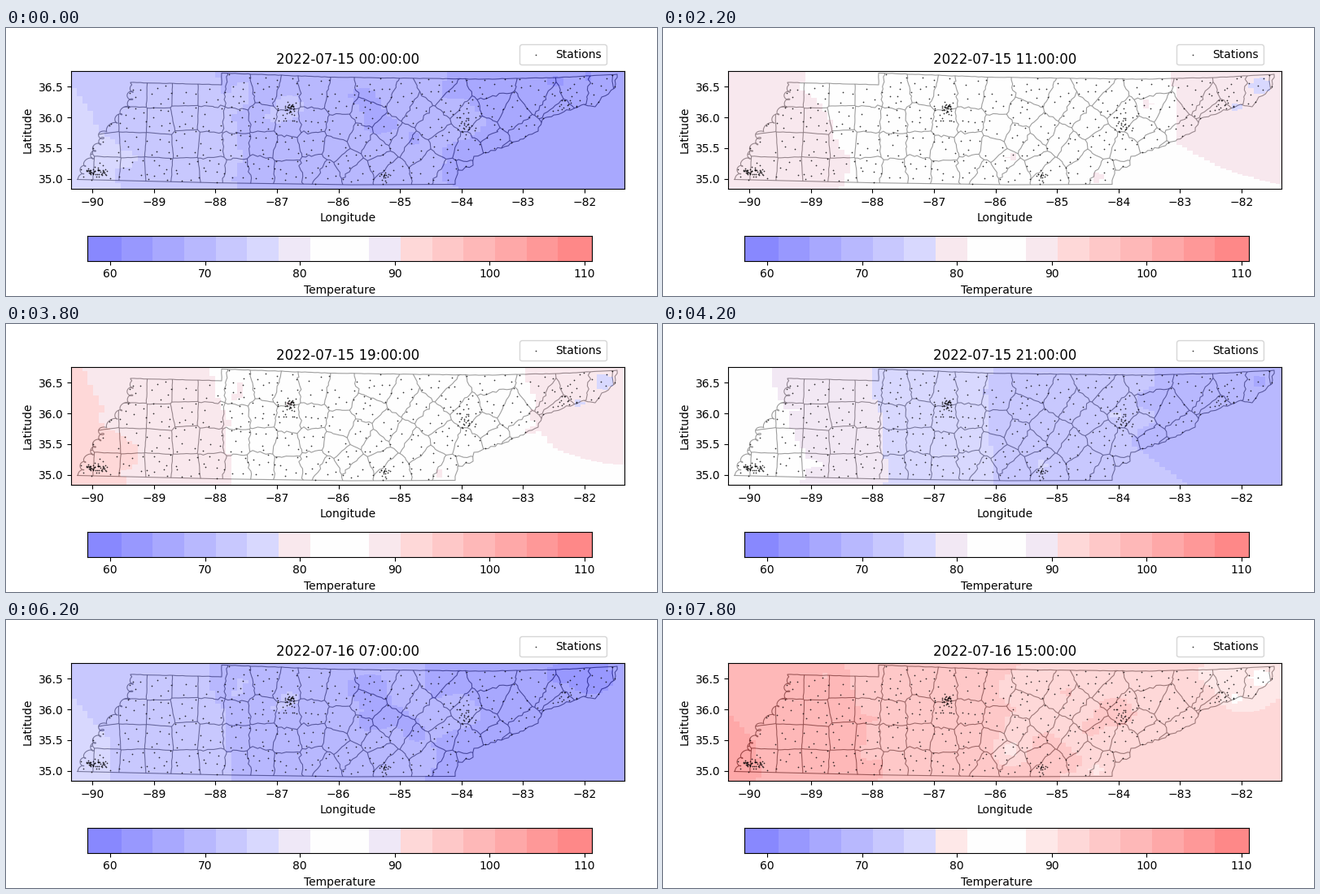
These frames come from a looping animation (800 px wide and 330 px high, 8 s). A matplotlib script:

```python
from itertools import combinations

import numpy as np
import matplotlib.pyplot as plt
from matplotlib.animation import FuncAnimation
from matplotlib.collections import LineCollection
from matplotlib.path import Path

W, H, DPI = 800, 330, 100
LEFT, RIGHT, TOP, BOTTOM = 80, 760, 52.75, 198
SCALE = 75.6  # pixels per degree
rng = np.random.default_rng(15)


def to_deg(x, y):
    """Stage pixels to longitude and latitude."""
    return -90 + (x - 106.22) / SCALE, 35 - (y - 185.6) / SCALE


def to_px(lon, lat):
    return 106.22 + SCALE * (lon + 90), 185.6 - SCALE * (lat - 35)


def rough(corners, wobble):
    """Path through the corners with small seeded bends."""
    pts = np.array(corners, float)
    out = [pts[:1]]
    for a, b in zip(pts, pts[1:]):
        n = max(1, int(np.hypot(*(b - a)) / 4))
        seg = a + (b - a) * np.linspace(0, 1, n + 1)[1:, None]
        seg[:-1] += rng.normal(0, wobble, (n - 1, 2))
        out.append(seg)
    return np.vstack(out)


def degrees(pts):
    return np.column_stack(to_deg(*pts.T))


# ---- state outline, in stage pixels ----
south = rough([(88, 186.5), (250, 190.5), (420, 193), (552, 192.5)], 0)
ridge = rough([(552, 192.5), (555, 175), (574, 169), (575, 158), (613, 146), (654, 127),
               (659, 113), (682, 105), (710, 94), (724, 97), (732, 85), (748, 74), (751, 57)], 0.8)
north = rough([(751, 57), (680, 61), (585, 63), (400, 60.5), (265, 55.5), (265, 70), (153, 67)], 0.15)

# the western edge is a river: a gentle line plus meanders
t = np.linspace(0, 1, 240)
bank = np.array([(153, 67), (154, 87), (141, 107), (119, 130), (112, 146), (99, 166), (88, 186.5)])
calm = np.minimum(1, 14 * t * (1 - t))
stops = np.linspace(0, 1, len(bank))
river = np.column_stack([
    np.interp(t, stops, bank[:, 0]) + calm * (3 * np.sin(26 * np.pi * t) + 2 * np.sin(11 * np.pi * t)),
    np.interp(t, stops, bank[:, 1]) + calm * 2.5 * np.cos(26 * np.pi * t)])
outline = degrees(np.vstack([south, ridge, north, river]))
state = Path(outline)


# ---- counties: cells around a lattice, square in the west, slanted in the east ----
def lattice():
    sites = []
    for col in range(26):
        for row in range(4):
            x = 90 + 33 * col - 0.12 * col ** 2
            y = 81 + 31 * row + 0.006 * (x - 90)
            east = np.clip((x - 270) / 200, 0, 1)
            y += 8 * east * (-1) ** col
            x += 0.8 * (120 - y) * np.clip((x - 380) / 120, 0, 1)
            sites.append(np.array([x, y]) + rng.normal(0, 1.5 + 4 * east, 2))
    return np.array(sites)


def cell_edges(sites):
    """Shared edges between the nearest-site cells."""
    norms = (sites ** 2).sum(1)
    for i, j in combinations(range(len(sites)), 2):
        a, b = sites[i], sites[j]
        if np.hypot(*(b - a)) > 110:
            continue
        mid, along = (a + b) / 2, np.array([a[1] - b[1], b[0] - a[0]])
        away = np.delete(a - sites, [i, j], axis=0)
        slope = 2 * away @ along
        limit = norms[i] - np.delete(norms, [i, j]) - 2 * away @ mid
        up, down = slope > 1e-9, slope < -1e-9
        lo = max(-3, (limit[up] / slope[up]).max(initial=-3))
        hi = min(3, (limit[down] / slope[down]).min(initial=3))
        if lo < hi:
            yield mid + lo * along, mid + hi * along


borders = [degrees(rough(edge, 0.2 if edge[0][0] < 265 else 0.9))
           for edge in cell_edges(lattice())]

# ---- stations: evenly scattered, dense in the cities ----
stations = [(-87.0, 35.6)]
while len(stations) < 400:
    tries = np.column_stack([rng.uniform(-90.2, -81.5, 40), rng.uniform(34.9, 36.72, 40)])
    tries = tries[state.contains_points(tries)][:4]
    gaps = np.hypot(*(tries[:, None] - np.array(stations)).transpose(2, 0, 1)).min(1)
    stations.append(tries[gaps.argmax()])
for lon, lat, spread, count in [(-90.03, 35.12, 0.04, 22), (-89.87, 35.12, 0.06, 26),
                                (-86.79, 36.15, 0.04, 24), (-86.8, 36.08, 0.11, 14),
                                (-83.97, 35.95, 0.10, 32), (-85.27, 35.04, 0.05, 18),
                                (-82.33, 36.33, 0.09, 16)]:
    stations.extend(rng.normal((lon, lat), spread, (count, 2)))
stations = np.array(stations)

# ---- temperature on a 100 x 100 grid ----
N = 100
cells = (np.arange(N) + 0.5) / N
px, py = np.meshgrid(LEFT + (RIGHT - LEFT) * cells, TOP + (BOTTOM - TOP) * cells)


def bump(x, y, sx, sy):
    return np.exp(-((px - x) / sx) ** 2 - ((py - y) / sy) ** 2)


# west to east position, following the slant of the mountains in the south-east
lean = np.clip((px - 520) / 60, 0, 1)
flow = px + lean * (50 * np.clip((py - 100) / 50, 0, 1) - 1.4 * np.maximum(0, py - 150))
s = (flow - 400) / 330
eastward = s - 0.3 * s ** 2

# lasting warm and cool places, and hills that only stand out by day
places = (1.7 * bump(95, 178, 150, 80) - 2.2 * bump(710, 60, 82, 82)
          + 1.6 * bump(352, 98, 26, 24) + 2.0 * bump(563, 115, 26, 18)
          - 1.3 * bump(440, 105, 30, 45) + 1.2 * bump(470, 172, 26, 26))
hills = 5 * (bump(428, 160, 16, 14) + bump(735, 72, 16, 14)
             + bump(704, 98, 9, 8) + bump(532, 184, 9, 8))
for lon, lat in stations[100:180]:
    places += rng.normal(0, 0.4) * bump(*to_px(lon, lat), 14, 11)


def daily(hour):
    return np.interp(hour, [0, 7, 10, 15, 18, 21, 24, 31, 34, 39],
                     [69.3, 69, 82, 92, 90, 74.6, 71, 69, 85.5, 94.8])


def temperature(hour):
    evening = np.exp(-((hour % 24 - 21) / 2) ** 2)
    sun = np.clip((daily(hour) - 72) / 22, 0, 1)
    return daily(hour) - 3.9 * (1 + 0.6 * evening) * eastward + places - sun * hills


# ---- blue-white-red in steps of 16 levels, laid half transparent over the map ----
T_MIN, T_MAX = 57.61, 110.77
MIDDLE, HALF = (T_MIN + T_MAX) / 2, (T_MAX - T_MIN) / 2


def shade(temp, hour):
    offset = (temp - MIDDLE) / HALF * 128
    step = np.clip((np.abs(offset) + 1) // 16, 0, 7)
    fade = np.where(step > 0, 16 * step + 7, 1)
    # the palest step takes on the warmth of the hour
    warm = np.clip((daily(hour) - 58) / 36, 0, 1)
    red_part = np.where(step == 1, warm, offset > 0)
    drop = np.stack([fade * (1 - red_part), fade, fade * red_part], axis=-1)
    return 1 - 2 * np.maximum(drop, 1) / 255


# ---- figure ----
fig = plt.figure(figsize=(W / DPI, H / DPI), dpi=DPI)


def panel(left, right, top, bottom):
    return fig.add_axes([left / W, 1 - bottom / H, (right - left) / W, (bottom - top) / H])


ax = panel(LEFT, RIGHT, TOP, BOTTOM)
x0, y0 = to_deg(LEFT, BOTTOM)
x1, y1 = to_deg(RIGHT, TOP)
field = ax.imshow(np.ones((N, N, 3)), extent=(x0, x1, y0, y1), aspect="auto",
                  interpolation="nearest", alpha=0.5, zorder=2)
counties = LineCollection(borders, colors="black", alpha=0.75, linewidths=0.8, zorder=1)
ax.add_collection(counties, autolim=False)
counties.set_clip_path(state, ax.transData)
ax.plot(*outline.T, color="black", alpha=0.75, lw=0.8, zorder=1)
dots = ax.scatter(*stations.T, s=1.5, c="black", alpha=0.8, linewidths=0,
                  label="Stations", zorder=2.2)
ax.set(xlim=(x0, x1), ylim=(y0, y1), xlabel="Longitude", ylabel="Latitude",
       xticks=range(-90, -81), yticks=np.arange(35, 36.6, 0.5))
title = ax.set_title("")
fig.legend(handles=[dots], loc="upper right", borderaxespad=0, scatterpoints=1,
           bbox_to_anchor=(737.8 / W, 1 - 20.3 / H))

cax = panel(100, 720, 255.7, 286.7)
scale = np.linspace(T_MIN, T_MAX, 620)[None]
bar = cax.imshow(np.ones((1, 620, 3)), extent=(T_MIN, T_MAX, 0, 1), aspect="auto",
                 interpolation="nearest", alpha=0.5)
cax.set(yticks=[], xticks=range(60, 111, 10), xlabel="Temperature")


def update(hour):
    field.set_data(shade(temperature(hour), hour))
    bar.set_data(shade(scale, hour))
    title.set_text(f"2022-07-{15 + hour // 24} {hour % 24:02d}:00:00")
    return field, bar, title


anim = FuncAnimation(fig, update, frames=40, interval=200, repeat=True, repeat_delay=0)
plt.show()
```
